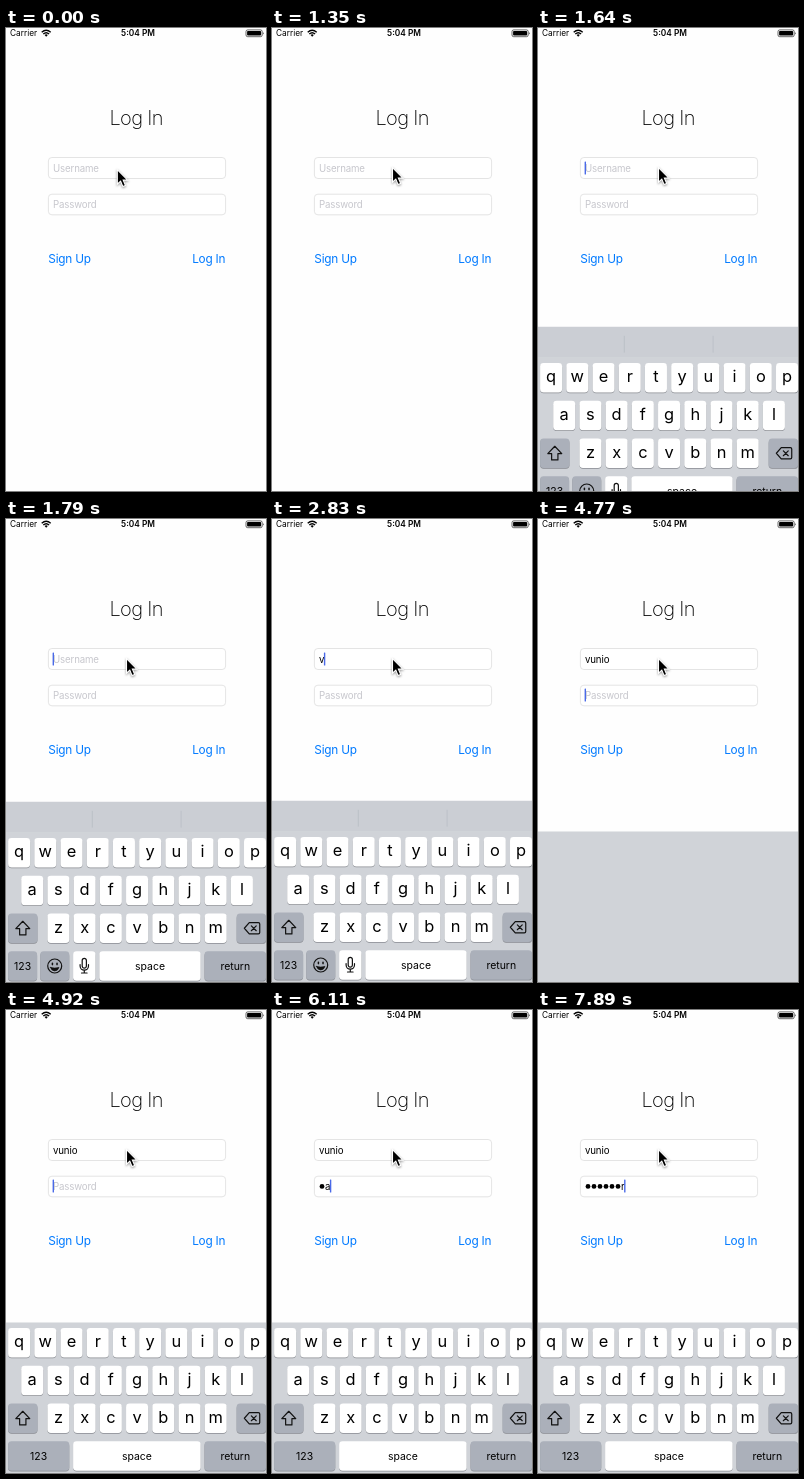
An HTML page for the animation above (8 s loop, 260 by 463 pixels).

```html
<!DOCTYPE html>
<html lang="en">
<head>
<meta charset="utf-8">
<title>Log In</title>
<style>
  html, body { margin: 0; width: 100%; height: 100%; overflow: hidden; background: #fefefe; }
  svg { display: block; width: 100%; height: 100%; font-family: Inter, "Open Sans", sans-serif; }
  .field { fill: #fff; stroke: #dedede; stroke-width: .8; }
  .input { font-size: 9.7px; letter-spacing: -.15px; }
  .hint { fill: #c7c7cd; }
  .button { font-size: 11.8px; letter-spacing: -.22px; fill: #007aff; }
  .status { font-size: 8.3px; }
  .line { fill: none; stroke: #111; stroke-width: 1.7; stroke-linejoin: round; stroke-linecap: round; }
  #cursor { filter: drop-shadow(0 1px 1px #0006); }
</style>
</head>
<body>
<svg viewBox="0 0 260 463">
  <rect width="260" height="463" fill="#fefefe"/>
  <g class="status">
    <text x="4" y="8">Carrier</text>
    <text x="132" y="8" text-anchor="middle" font-weight="600">5:04 PM</text>
  </g>
  <g fill="none" stroke="#000" stroke-width="1.4">
    <path d="M35.7 4.2Q40.2 .3 44.7 4.2M37.3 6Q40.2 3.4 43.1 6"/>
    <path d="M38.6 7Q40.2 5.6 41.8 7L40.2 8.7Z" fill="#000" stroke="none"/>
  </g>
  <rect x="240" y="1.9" width="16.2" height="6.8" rx="1.7" fill="none" stroke="#000" stroke-width=".6"/>
  <rect x="241.1" y="3" width="14" height="4.6" rx=".8"/>
  <path d="M257 4.2q1.3 1.1 0 2.2z"/>

  <text x="130.2" y="97" text-anchor="middle" font-size="20" font-weight="200" letter-spacing="-.65">Log In</text>
  <rect class="field" x="42.4" y="129.5" width="177.2" height="21" rx="3.5"/>
  <rect class="field" x="42.4" y="166.2" width="177.2" height="20.6" rx="3.5"/>
  <text class="input" id="user" x="47" y="143.6"/>
  <g id="dots"></g>
  <text class="input" id="pass" y="179.7"/>
  <rect id="caret" width="1.4" height="13" rx=".5" fill="#4a6ae8"/>
  <text class="button" x="42.3" y="234.8">Sign Up</text>
  <text class="button" x="219.3" y="234.8" text-anchor="end">Log In</text>

  <g id="keyboard"></g>
  <path id="cursor" d="M0 0V14.6L3.3 11.5 5.6 17 8.2 15.9 5.9 10.5H10.4Z" stroke="#fff" stroke-width="1.1"/>
</svg>
<script>
const $ = id => document.getElementById(id);
const LOOP = 8000, POINT = .699, KEYS_TOP = 312.5;

// The keyboard is laid out in device points.
const key = (x, y, width, label = '', { dark = false, size = 15, base = 26.4 } = {}) => `
  <rect x="${x}" y="${y + 1.2}" width="${width}" height="42" rx="5" fill="#888b91"/>
  <rect x="${x}" y="${y}" width="${width}" height="42" rx="5" fill="${dark ? '#abb0ba' : '#fff'}"/>
  <text x="${x + width / 2}" y="${y + base}" font-size="${size}" text-anchor="middle">${label}</text>`;

const rowTop = row => 8 + 54 * row;
const letters = ['qwertyuiop', 'asdfghjkl', 'zxcvbnm'].map((row, r) =>
  [...row].map((letter, i) =>
    key([3, 21.75, 59.25][r] + 37.5 * i, rowTop(r), 31.5, letter, { size: 23.5, base: 27.6 })).join('')).join('');
const [third, fourth] = [rowTop(2), rowTop(3)];
const dark = { dark: true };

$('keyboard').innerHTML = `
  <rect id="bar" y="-44" width="375" height="44.5" fill="#cbced4"/>
  <rect width="375" height="230" fill="#d0d3d8"/>
  <path id="dividers" d="M123.5 -31V-7M250.5 -31V-7" stroke="#b6bac1"/>
  <g id="keys">
    ${letters}
    ${key(3, third, 42, '', dark)}
    ${key(330, third, 42, '', dark)}
    <path class="line" d="M24 ${third + 11}l10 10.5h-5.5v9h-9v-9H14z"/>
    <path class="line" d="M341 ${third + 21}l7-8h13q2 0 2 2v12q0 2-2 2h-13zm10-3.5l7 7m0-7l-7 7"/>
    ${key(284, fourth, 88, 'return', dark)}
    <g id="fullRow">
      ${key(3, fourth, 41.5, '123', dark)}
      ${key(49, fourth, 41.5, '', dark)}
      ${key(96, fourth, 32, '')}
      ${key(133.5, fourth, 145, 'space')}
      <g class="line" transform="translate(69.7 ${fourth + 21})">
        <circle r="10"/>
        <path d="M-6 2Q0 4 6 2Q4.5 7 0 7T-6 2Z" fill="#111" stroke-width="1"/>
        <path d="M-3.3 -4v2M3.3 -4v2" stroke-width="2.2"/>
      </g>
      <g class="line" transform="translate(112 ${fourth + 20})">
        <rect x="-3" y="-10" width="6" height="14" rx="3"/>
        <path d="M-6 -1v2a6 6 0 0 0 12 0v-2M0 7v4M-4 11h8"/>
      </g>
    </g>
    <g id="secureRow">
      ${key(3, fourth, 87.5, '123', dark)}
      ${key(96, fourth, 182.5, 'space')}
    </g>
  </g>`;

// Each step holds only what changes at that time.
const steps = [
  [0, { cursor: [111.3, 141.6], user: '', pass: '', focus: '', blink: 1, drop: 999, keys: 'full' }],
  [1350, { cursor: [120.5, 139.6] }],
  [1490, { drop: 116 }],
  [1640, { drop: 17, focus: 'user' }],
  [1790, { drop: 1 }],
  [1940, { drop: 0 }],
  [2230, { blink: .3 }],
  [2380, { blink: 0 }],
  [2680, { blink: 1 }],
  [2830, { user: 'v' }],
  [3420, { user: 'vuni' }],
  [4020, { blink: .3 }],
  [4170, { blink: 0 }],
  [4320, { user: 'vunio', blink: 1 }],
  [4770, { focus: 'pass', keys: 'blank' }],
  [4920, { keys: 'secure' }],
  [5510, { pass: 'p' }],
  [6110, { pass: 'pa' }],
  [6410, { pass: 'pas' }],
  [6560, { pass: 'pass' }],
  [7150, { blink: .3 }],
  [7300, { blink: 0 }],
  [7450, { pass: 'passw', blink: 1 }],
  [7740, { pass: 'passwo' }],
  [7890, { pass: 'passwor' }],
];

const stateAt = time => Object.assign({}, ...steps.filter(([at]) => at <= time).map(([, change]) => change));
const show = (id, visible) => $(id).style.display = visible ? '' : 'none';

function fill(id, value, hint) {
  $(id).textContent = value || hint;
  $(id).classList.toggle('hint', !value);
}

function draw(state) {
  const { cursor, user, pass, focus, blink, drop, keys } = state;
  const hidden = Math.max(0, pass.length - 1);
  const passLeft = 47 + 6 * hidden;
  fill('user', user, 'Username');
  fill('pass', pass.slice(-1), 'Password');
  $('pass').setAttribute('x', passLeft);
  $('dots').innerHTML = Array.from({ length: hidden }, (_, i) =>
    `<circle cx="${50 + 6 * i}" cy="176.4" r="2.4"/>`).join('');

  const left = focus === 'pass' ? passLeft : 47;
  const typed = state[focus] ? $(focus).getComputedTextLength() : 0;
  $('caret').setAttribute('x', left - .4 + typed);
  $('caret').setAttribute('y', focus === 'pass' ? 169.6 : 133.5);
  $('caret').setAttribute('opacity', focus ? blink : 0);

  $('keyboard').setAttribute('transform', `translate(0 ${KEYS_TOP + drop}) scale(${POINT})`);
  for (const id of ['bar', 'dividers', 'fullRow']) show(id, keys === 'full');
  show('secureRow', keys === 'secure');
  show('keys', keys !== 'blank');
  $('cursor').setAttribute('transform', `translate(${cursor})`);
}

function tick() {
  draw(stateAt(performance.now() % LOOP));
  requestAnimationFrame(tick);
}
tick();
</script>
</body>
</html>
```
